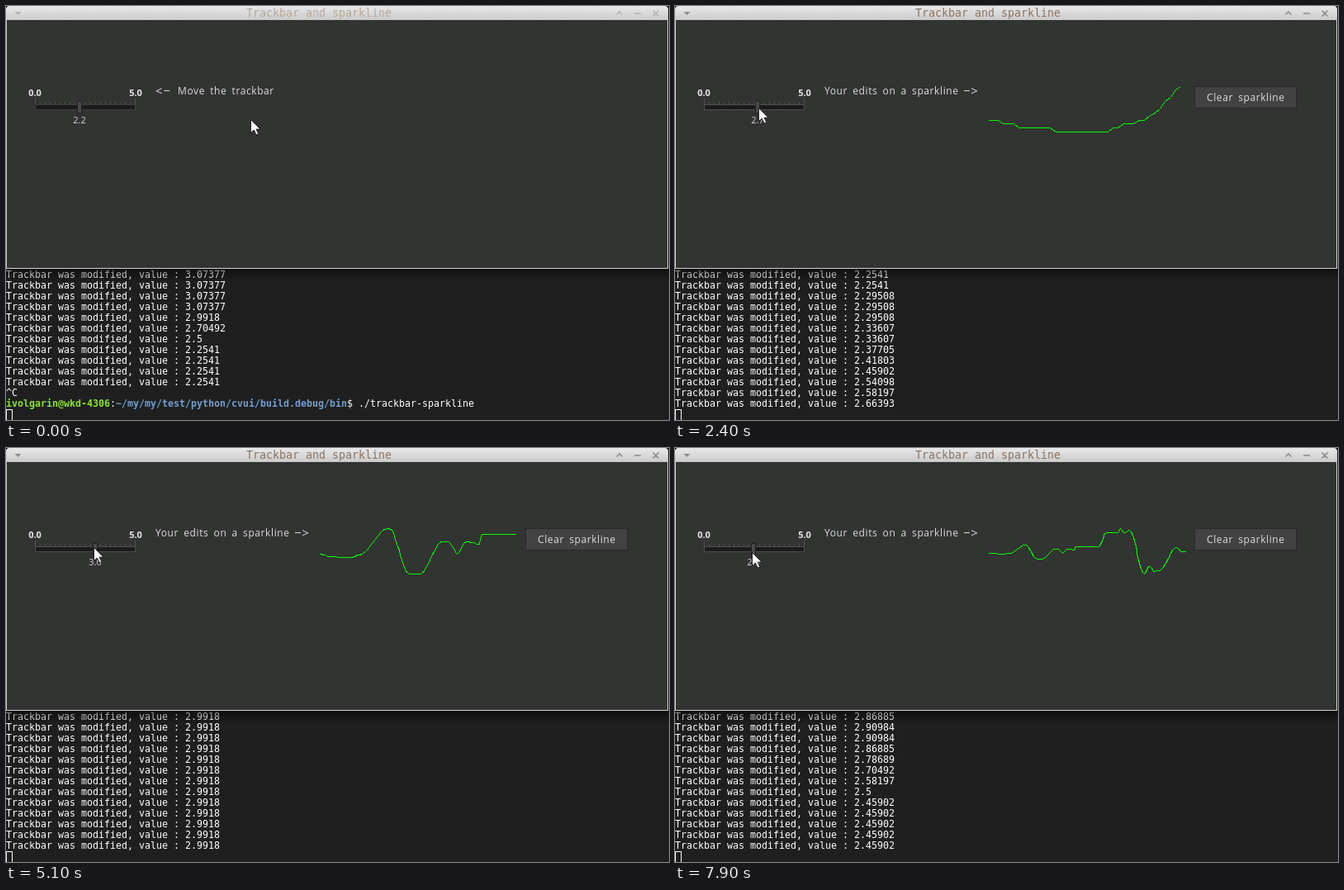
Write an HTML page that moves like this. It is 803 px wide and 501 px high and loops after 8000 ms.

```html
<!DOCTYPE html>
<html lang="en">
<head>
<meta charset="utf-8">
<title>Trackbar and sparkline</title>
<style>
html, body { margin: 0; width: 100%; height: 100%; overflow: hidden; background: #1f1f1f; }
svg { display: block; width: 803px; height: 501px; }
.term { font: 11.63px "DejaVu Sans Mono", monospace; fill: #fff; white-space: pre; }
.term .b { font-weight: bold; }
.title { font: 13.29px "DejaVu Sans Mono", monospace; text-anchor: middle; }
.ui { font: 12px "Open Sans", sans-serif; fill: #dedede; letter-spacing: .6px; word-spacing: 2.5px; }
.arrow { font-size: 15px; }
.num { font: 11px "Open Sans", sans-serif; fill: #d4d4d4; text-anchor: middle; }
.end { font-weight: 700; fill: #e8e8e8; }
.crisp { shape-rendering: crispEdges; }
</style>
</head>
<body>
<svg viewBox="0 0 803 501">
  <defs>
    <linearGradient id="bar" x2="0" y2="1">
      <stop stop-color="#e9e9e9"/><stop offset="1" stop-color="#cacaca"/>
    </linearGradient>
    <linearGradient id="shade" x2="0" y2="1">
      <stop stop-color="#000" stop-opacity=".5"/><stop offset="1" stop-color="#000" stop-opacity="0"/>
    </linearGradient>
  </defs>
  <rect width="803" height="501" fill="#1f1f1f"/>
  <g id="rows" class="term"></g>
  <rect class="crisp" x=".5" y="488.5" width="7" height="14" fill="none" stroke="#fff"/>
  <rect y="318" width="803" height="16" fill="url(#shade)"/>

  <path d="M0 318V5Q0 0 5 0H797Q802 0 802 5V318Z" fill="#d2d2d0"/>
  <path d="M0 17V5Q0 0 5 0H797Q802 0 802 5V17Z" fill="url(#bar)"/>
  <rect x="1" y="17" width="800" height="300" fill="#313431"/>
  <text id="title" class="title" x="379" y="13">Trackbar and sparkline</text>
  <g id="buttons" fill="none" stroke-width="1.6">
    <path id="menu" d="M10.5 7H18.5L14.5 11Z" stroke="none"/>
    <path d="M739.5 10.5L743 7L746.5 10.5M761 9H769M783.5 5.5L790.5 12.5M790.5 5.5L783.5 12.5"/>
  </g>

  <g class="crisp">
    <path id="ticks" fill="none" stroke="#515151"/>
    <rect id="track" x="35.5" y="119.5" width="121" height="6" fill="#1a1b1a"/>
  </g>
  <text class="num end" x="35" y="109">0.0</text>
  <text class="num end" x="157" y="109">5.0</text>
  <g id="handle">
    <rect class="crisp" x="-2.5" y="115.5" width="5" height="14" fill="#4a4a4a" stroke="#212121"/>
    <text id="value" class="num" y="142"></text>
  </g>

  <g id="hint" class="ui">
    <text class="arrow" x="181" y="108">&lt;−</text><text x="208" y="107">Move the trackbar</text>
  </g>
  <g id="chart" class="ui">
    <text x="181" y="107">Your edits on a sparkline</text><text class="arrow" x="349" y="108">−&gt;</text>
    <rect class="crisp" x="629.5" y="97.5" width="123" height="26" fill="#424242" stroke="#292929"/>
    <text x="644" y="115">Clear sparkline</text>
    <polyline id="line" class="crisp" fill="none" stroke="#0f0"/>
  </g>
  <path id="mouse" d="M0 0V16L3.9 12.6L6.5 18.4L9.2 17.2L6.6 11.6H11.6Z" fill="#fff" stroke="#222"/>
</svg>
<script>
const $ = id => document.getElementById(id);
const LOOP = 8000, STEP = 100, START = 1500, ROWS = 13;
const LEFT = 35, SPAN = 122, MAX = 5;

const clamp = u => Math.min(1, Math.max(0, u));
const smooth = u => u * u * (3 - 2 * u);
const linear = u => u;

function at(keys, k, ease) {
  const i = Math.max(1, keys.findIndex(key => key[0] >= k));
  const [k0, v0] = keys[i - 1], [k1, v1] = keys[i];
  return v0 + (v1 - v0) * ease(clamp((k - k0) / (k1 - k0)));
}

// Turning points of the drag: edit number, slider position in pixels
const turns = [[0, 57.2], [8, 54.8], [21, 53.8], [27, 56], [48, 78], [62, 41], [69, 41], [85, 67],
  [89, 67], [95, 57], [101, 67], [110, 65], [112, 73], [140, 73], [151, 110], [165, 110], [168, 122],
  [174, 110], [180, 116], [199, 3], [205, 22], [211, 9], [217, 10], [240, 71], [246, 60], [260, 60]];
const slider = i => Math.round(at(turns, i, smooth));

// Edits made by a given time, with two short pauses
const pace = [[1500, 3], [2400, 38], [2600, 38], [2700, 50], [3100, 50], [3200, 54], [6300, 188], [7900, 252]];

const toValue = px => px * MAX / SPAN;
const log = px => `Trackbar was modified, value : ${+toValue(px).toPrecision(6)}`;
const prompt = '<tspan class="b" fill="#8ae234">ivolgarin@wkd-4306</tspan>:' +
  '<tspan class="b" fill="#729fcf">~/my/my/test/python/cvui/build.debug/bin</tspan>$ ./trackbar-sparkline';
const history = [75, 75, 75, 75, 73, 66, 61, 55, 55, 55, 55].map(log).concat('^C', prompt);

let ticks = 'M35.5 112V120M156.5 112V120';
for (let i = 1; i < 20; i++) ticks += `M${Math.floor(LEFT + i * SPAN / 20) + .5} 116V120`;
$('ticks').setAttribute('d', ticks);

const rows = Array.from({ length: ROWS }, (_, i) => {
  const row = document.createElementNS('http://www.w3.org/2000/svg', 'text');
  row.setAttribute('y', 329 + 13 * i);
  return $('rows').appendChild(row);
});

function drawChart(values) {
  const low = Math.min(...values), high = Math.max(...values);
  $('line').setAttribute('points', values.map((v, i) => {
    const x = Math.floor(379 + i * 240 / values.length);
    const y = Math.floor(97 + 55 * (high - v) / (high - low || 1));
    return `${x + .5},${y + .5}`;
  }).join(' '));
}

// An arc down to the trackbar, then a short swing around the handle
function approach(t) {
  const u = clamp((t - 200) / 500), s = clamp((t - 800) / 400);
  return [
    297 - 202 * u - 18 * Math.sin(Math.PI * s) - 3 * s,
    138 - 16 * u + 45 * Math.sin(Math.PI * u)
  ];
}

// The pointer is one edit ahead and drifts down near the end
function drag(t, n) {
  const drift = Math.max(0, t - 5100) / 400;
  return [LEFT - 1 + slider(n), 122 + drift + 2 * Math.sin((t - START) / 600)];
}

function draw(t) {
  const active = t >= 100, dragging = t >= START;
  const n = dragging ? Math.round(at(pace, t, linear)) : 0;
  const values = Array.from({ length: n }, (_, i) => slider(i));

  const grey = active ? '#8c8c8c' : '#b2b2b2';
  $('title').setAttribute('fill', active ? '#8a7262' : '#b8a898');
  $('buttons').setAttribute('stroke', grey);
  $('menu').setAttribute('fill', grey);
  $('track').setAttribute('stroke', dragging ? '#4e4e4e' : '#3e3e3e');
  $('hint').style.display = dragging ? 'none' : '';
  $('chart').style.display = dragging ? '' : 'none';

  const pos = dragging ? values[n - 2] : 54;
  $('handle').setAttribute('transform', `translate(${LEFT + pos} 0)`);
  $('value').textContent = toValue(pos).toFixed(1);
  drawChart(values);

  const lines = history.concat(values.slice(0, -1).map(log)).slice(-ROWS);
  rows.forEach((row, i) => { row.innerHTML = lines[i]; });

  const [x, y] = (dragging ? drag(t, n) : approach(t)).map(v => Math.round(v) - .5);
  $('mouse').setAttribute('transform', `translate(${x} ${y})`);
}

let last = -1;
function frame() {
  const t = Math.floor(performance.now() % LOOP / STEP) * STEP;
  if (t !== last) draw(last = t);
  requestAnimationFrame(frame);
}
frame();
</script>
</body>
</html>
```
